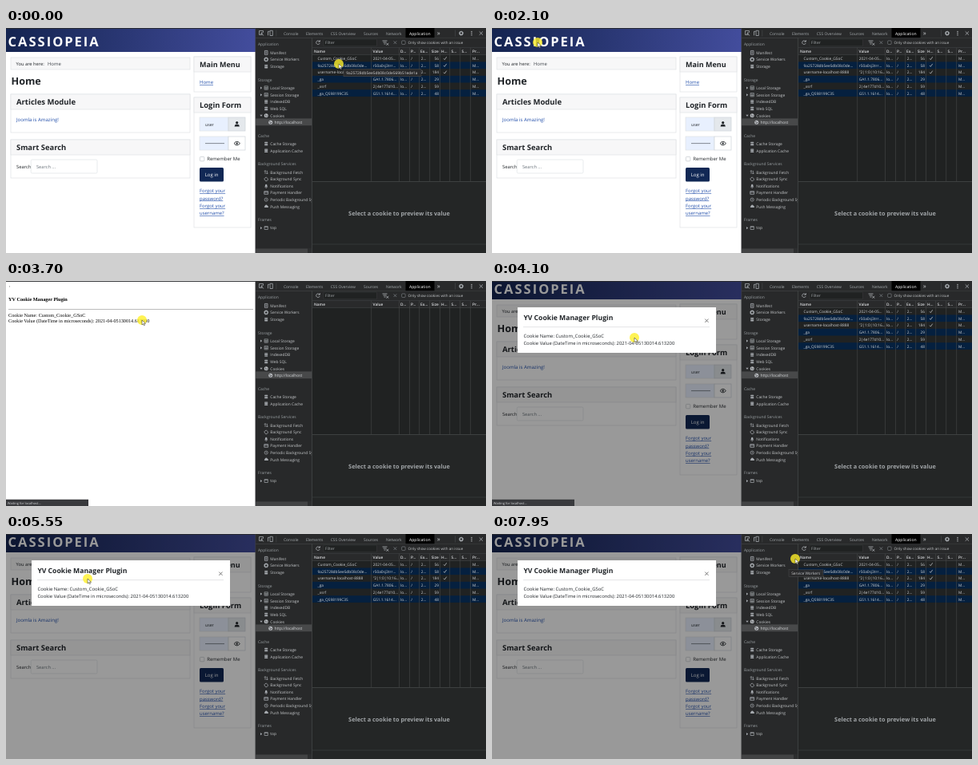
These frames come from a looping animation (600x282 px, 8000 ms). An HTML page:

```html
<!DOCTYPE html>
<html lang="en">
<head>
<meta charset="utf-8">
<title>Cookie manager demo</title>
<style>
html, body { margin: 0; width: 100%; height: 100%; overflow: hidden; background: #fff; }
svg { display: block; width: 600px; height: 282px; text-rendering: geometricPrecision; }
text { font-family: "Open Sans", "Noto Sans", sans-serif; white-space: pre; }
.b { font-weight: 700; }
.s { font-weight: 600; }
.u { text-decoration: underline; }
.serif text { font-family: "Liberation Serif", "Times New Roman", serif; }
</style>
</head>
<body>
<svg id="stage" viewBox="0 0 600 282" xmlns="http://www.w3.org/2000/svg"></svg>
<script>
const LOOP = 8000;

// Drawing helpers
const text = (x, y, str, size = 4.9, fill = '#c6c9cb', attrs = '') =>
  `<text x="${x}" y="${y}" font-size="${size}" fill="${fill}" ${attrs}>${str}</text>`;
const rect = (x, y, w, h, fill, attrs = '') =>
  `<rect x="${x}" y="${y}" width="${w}" height="${h}" fill="${fill}" ${attrs}/>`;
const path = (d, stroke = '#9aa0a6', width = 0.8, fill = 'none') =>
  `<path d="${d}" stroke="${stroke}" stroke-width="${width}" fill="${fill}"/>`;
const circle = (x, y, r, fill, attrs = '') =>
  `<circle cx="${x}" cy="${y}" r="${r}" fill="${fill}" ${attrs}/>`;
const group = (id, body, attrs = '') => `<g id="${id}" ${attrs}>${body}</g>`;

const INK = '#212529', LINK = '#224faa', EDGE = 'stroke="#dfe2e6" stroke-width=".7"';
const NAME = 'Cookie Name: Custom_Cookie_GSoC';
const VALUE = 'Cookie Value (DateTime in microseconds): 2021-04-05130014.613200';
const TITLE = 'YV Cookie Manager Plugin';

// Website
const card = (x, y, w, h, title, size) =>
  rect(x, y, w, h, '#fff', EDGE) + rect(x, y, w, 19, '#f7f7f8', EDGE) +
  text(x + 7, y + 13.2, title, size, INK, 'class="b"');

function site() {
  const links = [['Forgot your', 206], ['password?', 215.5], ['Forgot your', 225], ['username?', 234.3]];
  const dots = Array.from({ length: 12 }, (_, i) => circle(250 + i * 2, 144.6, 0.6, INK)).join('');
  return rect(0, 0, 312, 30, 'url(#head)') +
    text(2.6, 23.3, 'CASSIOPEIA', 16.5, '#fff', 'class="b" letter-spacing="2"') +
    rect(6, 37, 224, 15, '#f7f7f8', EDGE) +
    text(12.5, 46.7, 'You are here:', 5.75, INK) + text(52, 46.7, 'Home', 5.9, '#3f454b') +
    text(6.5, 71, 'Home', 12.6, INK, 'class="b"') +
    card(6, 83, 224, 48, 'Articles Module', 9.5) + text(13, 116.8, 'Joomla is Amazing!', 6.05, LINK) +
    card(6, 140, 224, 48, 'Smart Search', 9.4) + text(13, 176, 'Search', 5.8, INK) +
    rect(31.2, 165, 82.8, 17, '#fff', 'rx="1.5" ' + EDGE) + text(38, 175.7, 'Search ...', 5.7, '#6c757d') +
    card(235, 36, 71, 44, 'Main Menu', 9) + text(242, 70, 'Home', 6, LINK, 'class="u"') +
    card(235, 87, 71, 163, 'Login Form', 9.4) +
    rect(242, 112, 36, 17, '#e8f0fe', EDGE) + rect(278, 112, 21, 17, '#e4e8ec', 'stroke="#ced4da" stroke-width=".7"') +
    text(249, 122.7, 'user', 5.2, INK) +
    circle(288.7, 118.7, 1.6, INK) + path('M285.6 123.4q0-2.6 2-2.6h2.2q2 0 2 2.6z', 'none', 0, INK) +
    rect(242, 136, 36, 17, '#e8f0fe', EDGE) + rect(278, 136, 21, 17, '#fff', 'stroke="#ced4da" stroke-width=".7"') +
    dots + path('M285 144.6q3.7-4.6 7.4 0q-3.7 4.6-7.4 0z', INK, 0.9) + circle(288.7, 144.6, 1.2, INK) +
    rect(242.4, 161.4, 5.4, 5.4, '#fff', 'rx="1" stroke="#b8bdc3" stroke-width=".6"') +
    text(251.2, 166.4, 'Remember Me', 6, INK) +
    rect(242, 175, 30, 17.5, '#112855', 'rx="1.5"') + text(248.7, 186, 'Log in', 6, '#fff') +
    links.map(([s, y]) => text(242, y, s, 5.95, LINK, 'class="u"')).join('');
}

const modal = () => rect(32, 33, 248, 57, '#fff') +
  text(39.4, 49, TITLE, 8.65, INK, 'class="b"') +
  path('M266.3 47.6l4.2 4.2m0-4.2l-4.2 4.2', '#777', 1) + rect(39, 57.4, 233, 0.7, '#d8dadd') +
  text(39.4, 71.2, NAME, 5.95, INK) + text(39.4, 80.3, VALUE, 5.9, INK);

const dump = () => rect(0, 0, 312, 282, '#fff') + text(3.5, 10, '‘', 6.2, '#333') +
  text(3, 25.4, TITLE, 6.24, '#000', 'class="b"') + rect(3, 35, 306, 0.8, '#aaa') +
  text(3, 44.8, NAME, 6.23, '#000') + text(3, 52, VALUE, 6.2, '#000');

// Developer tools
const glyphs = {
  file: (x, y) => path(`M${x - 1.8} ${y - 2.5}h3.6v5h-3.6zm1 1.6h1.8m-1.8 1.5h1.8`, '#a5a9ae', 0.8),
  gear: (x, y) => circle(x, y, 1.9, 'none', 'stroke="#a5a9ae" stroke-width="1.3"') +
    circle(x, y, 2.6, 'none', 'stroke="#a5a9ae" stroke-width=".7" stroke-dasharray="1 1.04"'),
  db: (x, y) => [-2.2, -0.6, 1].map(d => rect(x - 2.1, y + d, 4.2, 1.3, '#a5a9ae', 'rx=".6"')).join(''),
  grid: (x, y) => path(`M${x - 2.2} ${y - 2.2}h4.4v4.4h-4.4zm0 1.5h4.4m-4.4 1.5h4.4m-2.2-1.5v3`, '#a5a9ae', 0.6),
  cookie: (x, y) => circle(x, y, 2.5, '#b9bcc0') + circle(x - 0.8, y - 0.6, 0.55, '#292a2b') +
    circle(x + 1, y + 0.4, 0.55, '#292a2b') + circle(x - 0.4, y + 1.1, 0.5, '#292a2b'),
  arrows: (x, y) => path(`M${x - 1.2} ${y + 2}v-4.2m-1.2 1.3l1.2-1.3l1.2 1.3M${x + 1.2} ${y - 2}v4.2m-1.2-1.3l1.2 1.3l1.2-1.3`, '#a5a9ae', 0.7),
  sync: (x, y) => path(`M${x - 2} ${y + 0.6}a2 2 0 0 1 3.4-2l.6.7M${x + 2} ${y - 0.4}a2 2 0 0 1-3.4 2l-.6-.7`, '#a5a9ae', 0.8),
  bell: (x, y) => path(`M${x - 2.1} ${y + 1.4}q.8-.7.8-2q0-1.6 1.3-1.6t1.3 1.6q0 1.3.8 2zm1.5.7h1.2v.6h-1.2z`, 'none', 0, '#a5a9ae'),
  pay: (x, y) => path(`M${x - 2.4} ${y - 1.8}h4.8v3.6h-4.8zm0 1.2h4.8`, '#a5a9ae', 0.8),
  clock: (x, y) => circle(x, y, 2.1, 'none', 'stroke="#a5a9ae" stroke-width=".7"') + path(`M${x} ${y - 1.2}v1.3l1 .6`, '#a5a9ae', 0.6),
  cloud: (x, y) => path(`M${x - 1.8} ${y + 1.4}q-1.4-.9 0-1.9q.4-1.7 1.9-1.7t1.7 1.6q2 .7.4 2z`, 'none', 0, '#a5a9ae'),
  frame: (x, y) => path(`M${x - 2.1} ${y - 1.9}h4.2v3.8h-4.2zm0 .6h4.2`, '#a5a9ae', 0.7)
};

function sidebar() {
  const heads = [['Application', 22.3], ['Storage', 67], ['Cache', 136.8], ['Background Services', 172.4], ['Frames', 242.2]];
  const items = [
    ['file', 'Manifest', 32.7], ['gear', 'Service Workers', 41.2], ['db', 'Storage', 49.9],
    ['grid', 'Local Storage', 76.8, '▸'], ['grid', 'Session Storage', 85.5, '▸'], ['db', 'IndexedDB', 94.2],
    ['db', 'Web SQL', 102.8], ['cookie', 'Cookies', 111.5, '▾'],
    ['db', 'Cache Storage', 146.8], ['db', 'Application Cache', 155.5],
    ['arrows', 'Background Fetch', 182.6], ['sync', 'Background Sync', 191.2], ['bell', 'Notifications', 199.8],
    ['pay', 'Payment Handler', 208.3], ['clock', 'Periodic Background Sync', 216.9], ['cloud', 'Push Messaging', 225.5],
    ['frame', 'top', 252.4, '▸']];
  const fold = (y, mark) => path(mark === '▸' ? `M318 ${y - 3.3}l2.2 1.6l-2.2 1.6z` : `M317.4 ${y - 2.7}h3.2l-1.6 2.2z`, 'none', 0, '#a5a9ae');
  return rect(312, 12, 70, 270, '#28292a') + rect(312, 113.4, 70, 8.8, '#48494a') +
    heads.map(([s, y]) => text(315, y, s, 4.95, '#9aa0a3')).join('') +
    items.map(([icon, s, y, mark]) => glyphs[icon](325.2, y - 1.8) + text(330.3, y, s, 4.9) + (mark ? fold(y, mark) : '')).join('') +
    glyphs.cookie(330.7, 118.2) + text(335.5, 120, 'http://localhost', 4.9, '#dfe1e4') +
    rect(312, 276, 70, 6, '#2d2e2f') + rect(312, 276.6, 65, 5.4, '#424344');
}

const COLS = [456.5, 491, 504, 516.5, 529.5, 542, 554.5, 567.5, 580.5];

function rows() {
  const data = [
    ['Custom_Cookie_GSoC', '2021-04-05...', 56, 1],
    ['9a25728db5ee5db08c0de...', 'r50a0sj3trr...', 58, 1],
    ['username-localhost-8888', '"2|1:0|10:16...', 184, 1],
    ['_ga', 'GA1.1.7806...', 29, 0],
    ['_xsrf', '2|4e177d10...', 59, 0],
    ['_ga_QS98199C3S', 'GS1.1.1614...', 48, 0]];
  return data.map(([name, value, size, http], i) => {
    const y = 40 + i * 8.7, put = (x, s, attrs) => text(x, y, s, 4.8, '#d0d3d6', attrs);
    return (i % 2 ? rect(383, y - 6.3, 217, 8.7, '#05203f') : '') +
      put(389.5, name) + put(458.7, value) + put(493, 'lo...') + put(506.3, '/') + put(518.7, '2...') +
      put(541, size, 'text-anchor="end"') + put(583, 'M...') +
      (http ? path(`M547 ${y - 1.7}l1.3 1.4l2.4-3.5`, '#d0d3d6', 0.7) : '');
  }).join('');
}

function tools() {
  const tabs = [[347, 'Console'], [375, 'Elements'], [405.7, 'CSS Overview'], [447, 'Sources'], [475, 'Network']];
  const heads = [[385, 'Name'], [458.5, 'Value'], [493, 'D...'], [506, 'P...'], [518, 'Ex...'], [531.7, 'Size'],
    [544, 'H...'], [556.5, 'S...'], [569.5, 'S...'], [583, 'Pr...']];
  return rect(312, 0, 288, 282, '#202222') + sidebar() +
    // Keeps long labels inside the side panel
    rect(382, 12, 218, 270, '#202222') +
    rect(312, 0, 288, 12.5, '#292a2b') + rect(312, 12.2, 288, 0.6, '#454748') +
    path('M320.5 8.5h-4v-5h5v2.2M319 6l2.8 3.6M319 8V6h2', '#a5a9ae', 0.8) +
    path('M327.5 9.3v-5h2M330 3.3h3.3v6.2H330z', '#a5a9ae', 0.8) + rect(337.6, 2.5, 0.6, 8, '#494c4d') +
    tabs.map(([x, s]) => text(x, 8.6, s, 4.95, '#a3a8ab')).join('') +
    rect(499.5, 0, 36, 12.2, '#000') + text(504, 8.6, 'Application', 5.1, '#fff') +
    text(538.7, 9, '»', 8, '#c6c9cb') + rect(561, 2.5, 0.6, 8, '#494c4d') + glyphs.gear(569, 6.6) +
    [4.4, 6.6, 8.8].map(y => circle(582, y, 0.75, '#b0b4b8')).join('') +
    path('M591.7 4.4l4.3 4.3m0-4.3l-4.3 4.3', '#b0b4b8', 0.8) +
    // Filter bar
    rect(383, 12.8, 217, 11.5, '#28292a') +
    path('M392 17a2.3 2.3 0 1 0 .2 2M392.4 15.2v2h-2', '#b0b4b8', 0.8) +
    rect(397, 14, 66.5, 8.8, '#202222', 'stroke="#3a3c3d" stroke-width=".5"') + text(399, 20.4, 'Filter', 5, '#a3a8ab') +
    path('M470.5 16h6m-5 2h4m-3 2h2M475.3 19l3 2.6m0-2.6l-3 2.6', '#b0b4b8', 0.8) +
    path('M484.6 16.4l3.6 3.6m0-3.6l-3.6 3.6', '#777b80', 0.8) +
    rect(494.7, 16, 4.4, 4.4, '#202222', 'rx=".7" stroke="#8b8f94" stroke-width=".6"') +
    text(502.6, 20.3, 'Only show cookies with an issue', 4.6) +
    // Cookie table
    rect(383, 24.3, 217, 9.4, '#292a2b') + rect(383, 24.2, 217, 0.5, '#454748') + rect(383, 33.4, 217, 0.5, '#454748') +
    heads.map(([x, s]) => text(x, 30.8, s, 4.8, '#dfe1e4', 'class="s"')).join('') +
    group('rows', rows()) + COLS.map(x => rect(x, 24.5, 0.6, 168, '#464849')).join('') +
    rect(383, 192.5, 217, 89.5, '#242626') + rect(383, 192.3, 217, 0.7, '#494c4d') +
    text(491.5, 235, 'Select a cookie to preview its value', 7.3, '#a0a4a7', 'class="b" text-anchor="middle"') +
    rect(383, 270.7, 217, 0.6, '#3d3f40') + rect(382, 12.5, 0.7, 269.5, '#494c4d');
}

const tip = (id, x, y, w, s) => group(id,
  rect(x, y, w, 9, '#2b2b2c', 'stroke="#55575a" stroke-width=".4"') + text(x + 3.2, y + 6.3, s, 4.85, '#d4d4d4'));

document.getElementById('stage').innerHTML =
  `<defs><linearGradient id="head" gradientUnits="userSpaceOnUse" x1="0" y1="0" x2="312" y2="30">
    <stop stop-color="#142450"/><stop offset="1" stop-color="#434d9d"/></linearGradient></defs>` +
  rect(0, 0, 312, 282, '#fff') + group('site', site()) + group('dump', dump(), 'class="serif"') +
  group('veil', rect(0, 0, 312, 282, '#000', 'opacity=".4"') + modal()) +
  rect(0, 0, 312, 0.9, '#2a2b2e') +
  group('status', rect(0, 273.8, 103, 8.2, '#393a3d') + text(1.8, 279.6, 'Waiting for localhost...', 4.05, '#dcdee0')) +
  tools() + rect(311.5, 0, 0.7, 282, '#3c3e40') +
  tip('tipHash', 422, 51.8, 97, '9a25728db5ee5db08c0de569b51ede1a') +
  tip('tipCookie', 421, 39.8, 56, 'Custom_Cookie_GSoC') +
  tip('tipWorkers', 371, 44.8, 43, 'Service Workers') +
  group('cursor', circle(0, 0, 6, '#fff029', 'opacity=".8"') +
    path('M0 0v6l1.5-1.3l1 2.2l1-.5l-1-2.1h2z', '#222', 0.5, '#fff'));

// Pointer stops: time, x, y
const STOPS = [
  [0, 416, 45], [450, 416, 45], [750, 420, 37], [1250, 420, 37], [1900, 57, 18], [2150, 57, 18], [2350, 22, -4],
  [2500, 22, -4], [2850, 50, 42], [3200, 95, 43], [3600, 170, 49], [3750, 170, 49], [4050, 178, 71], [4300, 178, 71],
  [4800, 150, 78], [5200, 60, 55], [5550, 102, 56], [5900, 140, 52], [6250, 85, 70], [6600, 135, 70],
  [6900, 180, 79], [7150, 225, 79], [7450, 362, 39], [7700, 365, 39], [7900, 379, 31], [8000, 379, 31]];

// Moment the reloaded page opens, slightly scrolled, under its dialog
const OPEN = 3850, SCROLL = -7;

const clamp = v => Math.max(0, Math.min(1, v));
const ease = v => v * v * (3 - 2 * v);
const within = (t, a, b) => t >= a && t < b ? 1 : 0;
const parts = Object.fromEntries(
  ['site', 'rows', 'dump', 'veil', 'status', 'tipHash', 'tipCookie', 'tipWorkers', 'cursor']
    .map(id => [id, document.getElementById(id)]));
const fade = (id, v) => parts[id].setAttribute('opacity', v);
const move = (id, x, y) => parts[id].setAttribute('transform', `translate(${x} ${y})`);

function pointer(t) {
  const i = Math.max(1, STOPS.findIndex(s => s[0] > t));
  const [t0, x0, y0] = STOPS[i - 1], [t1, x1, y1] = STOPS[i];
  const k = ease((t - t0) / (t1 - t0));
  return [x0 + (x1 - x0) * k, y0 + (y1 - y0) * k];
}

function draw(t) {
  const open = within(t, OPEN, LOOP);
  fade('dump', within(t, 2500, OPEN));
  fade('rows', 1 - within(t, 3500, OPEN));
  fade('veil', open);
  fade('status', Math.max(within(t, 2400, 2700), within(t, 3500, 4600)));
  fade('tipHash', within(t, 0, 500));
  fade('tipCookie', clamp((t - 800) / 120) * within(t, 800, 1300));
  fade('tipWorkers', 0.92 * within(t, 7700, LOOP));
  move('site', 0, open * SCROLL);
  move('cursor', ...pointer(t));
}

const start = performance.now();
function tick() {
  draw((performance.now() - start) % LOOP);
  requestAnimationFrame(tick);
}
tick();
</script>
</body>
</html>
```
